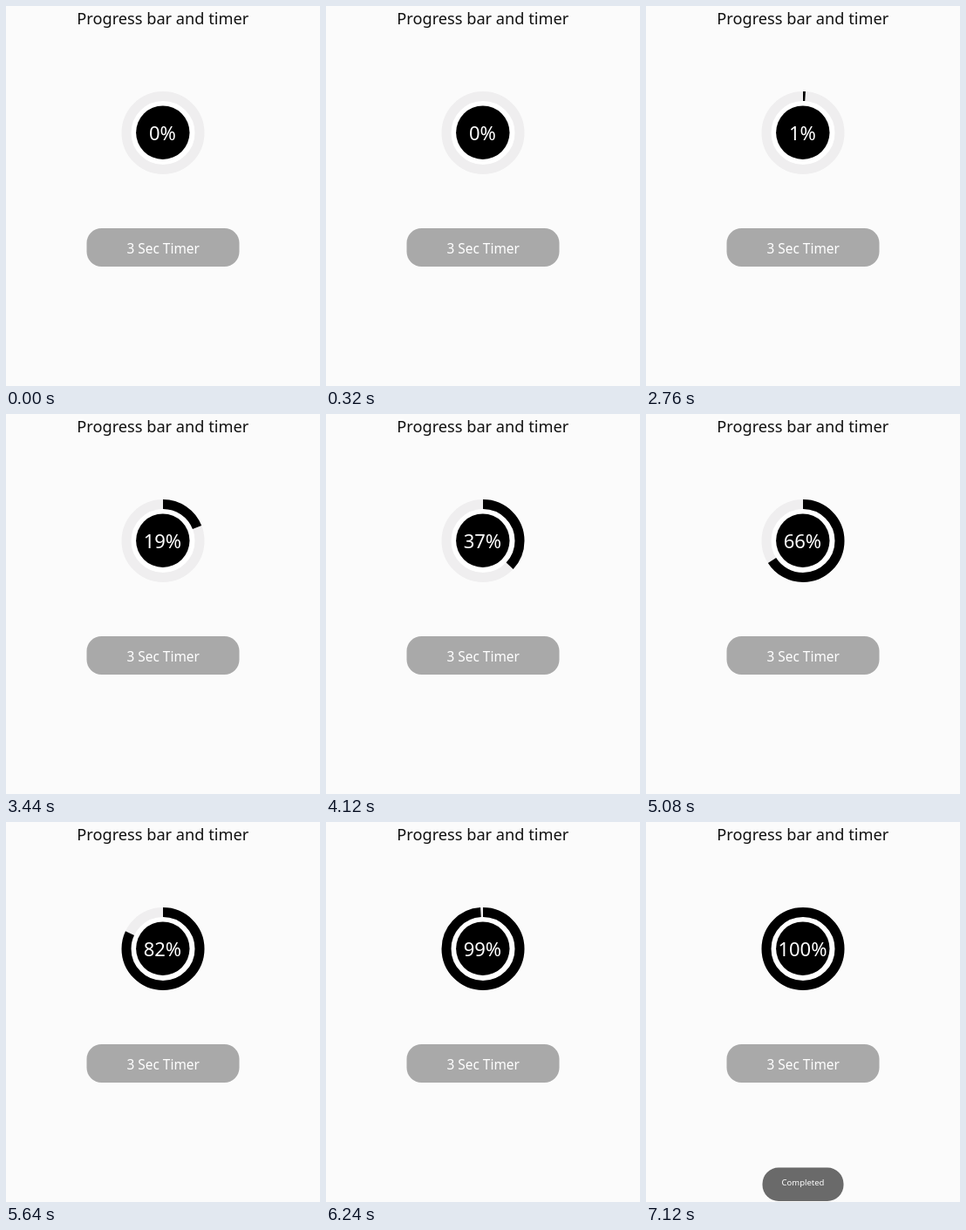
Recreate the animation shown at these times as an HTML page. Size 360x436 px, loop 8120 ms.

```html
<!DOCTYPE html>
<html lang="en">
<head>
<meta charset="utf-8">
<title>Progress bar and timer</title>
<style>
  html, body { margin: 0; width: 100%; height: 100%; overflow: hidden; background: #fbfbfb; }
  svg { display: block; width: 360px; height: 436px; }
  text { font-family: "Noto Sans", "Open Sans", sans-serif; text-anchor: middle; fill: #fff; }
  .title { font-size: 18.2px; fill: #111; }
  .percent { font-size: 22px; }
  .button { font-size: 15.4px; }
  .message { font-size: 9.5px; }
  .ring { fill: none; stroke-width: 11; }
</style>
</head>
<body>
<svg viewBox="0 0 360 436">
  <text class="title" x="179.8" y="21.3">Progress bar and timer</text>

  <circle cx="180" cy="145.5" r="37" fill="#fff"/>
  <circle class="ring" cx="180" cy="145.5" r="42" stroke="#efeeef"/>
  <circle class="ring" id="bar" cx="180" cy="145.5" r="42" stroke="#000"
          pathLength="100" transform="rotate(-90 180 145.5)"/>
  <circle cx="179.8" cy="145.2" r="30.7" fill="#000"/>
  <text class="percent" id="percent" x="179.4" y="154.4">0%</text>

  <rect x="92.5" y="255" width="175" height="44" rx="17" fill="#a9a9a9"/>
  <text class="button" x="180.2" y="283.6">3 Sec Timer</text>

  <g id="toast" opacity="0">
    <rect x="133.5" y="396.5" width="93" height="38.5" rx="18.5" fill="#6a6a6a"/>
    <text class="message" x="180" y="417">Completed</text>
  </g>
</svg>
<script>
  const LOOP = 8120, TICK = 40;
  const TOAST_START = 6600, TOAST_FADE = 520;
  // [time in ms, percent]
  const KEYS = [[2760, 1], [3440, 19], [4120, 37], [5080, 66], [6240, 99], [6280, 100]];

  const bar = document.getElementById('bar');
  const percent = document.getElementById('percent');
  const toast = document.getElementById('toast');

  function progressAt(time) {
    if (time < KEYS[0][0]) return 0;
    const next = KEYS.findIndex(([t]) => t > time);
    if (next < 0) return 100;
    const [t0, p0] = KEYS[next - 1], [t1, p1] = KEYS[next];
    return Math.round(p0 + (p1 - p0) * (time - t0) / (t1 - t0));
  }

  function toastAlpha(time) {
    const k = Math.min(1, Math.max(0, (time - TOAST_START) / TOAST_FADE));
    return 1 - (1 - k) ** 2;
  }

  function draw(now) {
    const time = Math.floor((now % LOOP) / TICK) * TICK;
    const value = progressAt(time);
    bar.style.visibility = value ? 'visible' : 'hidden';
    bar.setAttribute('stroke-dasharray', value < 100 ? `${value} 100` : 'none');
    percent.textContent = `${value}%`;
    toast.setAttribute('opacity', toastAlpha(time));
    requestAnimationFrame(draw);
  }
  draw(0);
</script>
</body>
</html>
```
